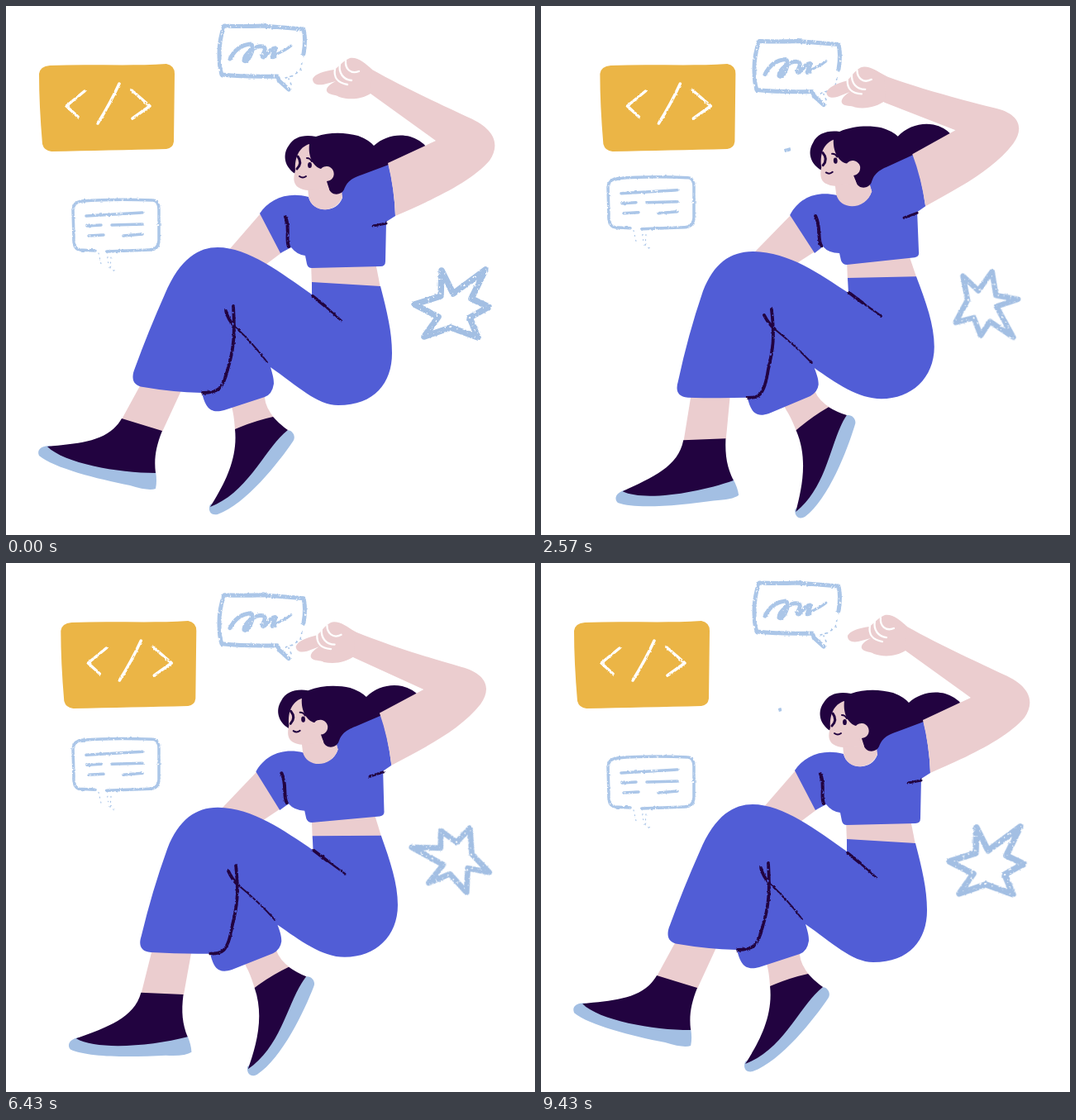
An HTML page for the animation above (9.5 s loop, 640 by 640 pixels).

```html
<!DOCTYPE html>
<html lang="en">
<head>
<meta charset="utf-8">
<title>Creative coding</title>
<style>
  html, body { margin: 0; width: 100%; height: 100%; overflow: hidden; background: #fff; }
  svg { display: block; width: 100vw; height: 100vh; }
  .blue { fill: #515dd6; }
  .skin { fill: #ebcdcf; }
  .dark { fill: #220340; }
  .sole { fill: #a3bfe3; }
  .line { fill: none; stroke-linecap: round; stroke-linejoin: round; filter: url(#chalk); }
  .pen { fill: none; stroke-linecap: round; }
  .ink { stroke: #220340; }
  .sky { stroke: #abc6e8; }
  .white { stroke: #fff; }
</style>
</head>
<body>
<svg viewBox="0 0 640 640">
  <defs>
    <filter id="chalk" x="-15%" y="-15%" width="130%" height="130%" color-interpolation-filters="sRGB">
      <feTurbulence type="fractalNoise" baseFrequency=".3" numOctaves="2" seed="4" result="noise"/>
      <feDisplacementMap in="SourceGraphic" in2="noise" scale="2.5" xChannelSelector="R" yChannelSelector="G" result="rough"/>
      <feColorMatrix in="noise" values="0 0 0 0 0  0 0 0 0 0  0 0 0 0 0  0 0 0 -9 7" result="grain"/>
      <feComposite in="rough" in2="grain" operator="in"/>
    </filter>
  </defs>

  <g id="card">
    <path fill="#ebb546" d="M40 82Q41 73 53 72C100 70 150 73 194 70Q204 72 204 82L203 164Q202 172 194 173C150 174 100 175 55 176Q46 175 44 167Q40 120 40 82Z"/>
    <g class="line white" stroke-width="3.5">
      <path d="M95 103L73 121L87 134"/>
      <path d="M137 94Q126 118 111 142"/>
      <path d="M152 102L174 121L153 136"/>
    </g>
  </g>

  <g id="sketch">
    <g class="line sky">
      <path stroke-width="5" d="M360 58Q363 40 360 28Q335 26 310 24Q285 25 264 24Q258 40 258 58Q258 75 261 83Q290 86 328 85L331 91L342 101"/>
      <path stroke-width="1.6" stroke-dasharray="2 5" d="M338 87L346 85L356 78L359 64M345 95L342 88"/>
      <path stroke-width="5" d="M271 64C276 54 284 47 296 46C303 50 292 70 288 66C288 58 302 47 311 49C318 52 306 62 312 62C316 58 322 50 326 51C326 56 318 64 325 61"/>
      <path stroke-width="3" d="M325 59C333 56 338 54 345 48"/>
      <path stroke-width="8" d="M291 62L290 65"/>
    </g>
  </g>

  <g id="note">
    <g class="line sky" stroke-width="3.5">
      <path d="M108 296L88 295Q81 292 82 280L81 246Q82 237 92 236Q130 233 178 235Q185 236 185 246L185 284Q184 295 174 295L122 297"/>
      <path d="M97 254Q130 252 165 250M98 266L115 265M128 265L165 264M100 278L118 277M142 278L165 276"/>
      <path stroke-width="1.2" stroke-dasharray="1 5" d="M112 299L115 312M122 298L124 313L132 322M127 304L126 317"/>
    </g>
  </g>

  <g id="star">
    <path class="line" stroke="#a3bfe3" stroke-width="7.5" d="M527 320L541 348L580 319L563 354L584 364L561 377L571 401L538 389L506 400L523 376L494 361L526 351Z"/>
  </g>

  <g id="curl">
    <g class="line sky" stroke-width="4" style="stroke-linecap:butt">
      <path pathLength="1" d="M254 194C266 190 278 176 281 162C282 148 268 147 265 160C264 172 274 182 302 173"/>
    </g>
  </g>

  <g id="rightFoot">
    <path class="skin" d="M268 455L312 450L313 474Q314 486 325 499L277 513Q276 495 273 485Z"/>
    <path class="sole" d="M341 513C348 514 351 522 347 527C330 552 290 603 256 615C247 617 244 610 247 603C285 590 310 535 341 513Z"/>
    <path class="dark" d="M277 512Q300 502 323 497Q332 507 341 513C313 535 294 588 247 606C262 582 281 550 277 512Z"/>
  </g>
  <g id="leftFoot">
    <path class="skin" d="M170 445L220 448L189 515L140 500Z"/>
    <path class="sole" d="M53 532C42 532 37 537 40 544C58 559 110 572 150 580Q172 587 181 584Q183 575 181 563C130 565 85 553 53 532Z"/>
    <path class="dark" d="M140 499L189 514C181 534 179 548 181 565C135 565 70 553 50 533C90 529 124 527 140 499Z"/>
  </g>

  <path class="skin" d="M308 251L262 304L310 316L334 298Z" data-to="M302 253L252 304L305 314L333 296Z"/>
  <path class="skin" d="M369 310L446 305L453 341L370 338Z" data-to="M370 306L444 298L455 330L371 333Z"/>

  <path class="blue"
    d="M370 334L453 339C461 370 467 394 467 420C467 456 446 483 402 483C376 483 352 459 320 437C323 447 324 451 324 457Q322 470 313 473L264 489C246 494 241 484 237 468Q200 467 166 461C153 459 151 450 156 438Q172 394 192 349C211 304 234 292 256 292C293 292 333 323 370 349Z"
    data-to="M371 329L454 327C466 358 476 386 476 412C476 450 448 475 412 475C384 475 357 456 331 438C335 448 336 453 336 458Q335 467 326 472L276 493C258 499 254 489 250 474Q213 475 178 474C165 473 163 465 166 455Q178 398 196 345C209 311 229 297 257 297C301 298 337 324 372 347Z"/>
  <g class="line ink" stroke-width="3.8">
    <path d="M371 351L386 363" data-to="M373 347L389 359"/>
    <path stroke-width="2.4" d="M386 363L406 381" data-to="M389 359L412 375"/>
    <path d="M275 363C277 395 276 415 268 440C262 466 255 467 238 468" data-to="M279 367C283 400 281 415 275 440C270 474 262 474 250 474"/>
    <path d="M266 369Q269 380 276 387" data-to="M270 374Q275 384 283 391"/>
    <path stroke-width="2" d="M276 387Q298 407 316 431" data-to="M283 391Q308 411 328 432"/>
  </g>

  <path class="blue"
    d="M366 231C340 224 318 234 307 251L332 299L345 292Q352 301 362 302L364 312Q365 317 370 317L453 315Q459 315 459 309L460 261L471 254Q470 222 462 188L425 198L402 213L407 232C400 252 370 250 366 231Z"
    data-to="M358 229C333 223 312 232 301 253L331 299L341 291Q348 299 361 299L363 308Q365 313 370 313L452 304Q458 303 457 297L455 249L465 242Q460 205 449 176L425 190L393 203L400 224C393 246 363 246 358 229Z"/>
  <g class="line ink" stroke-width="4">
    <path d="M338 255C344 268 338 282 342 291" data-to="M332 254C339 268 334 282 339 290"/>
    <path stroke-width="3" d="M444 266L460 263" data-to="M439 256L455 250"/>
  </g>
  <path class="skin" d="M364 208L366 230C370 252 400 251 407 231L404 205Z" data-to="M354 204L357 228C362 248 393 247 400 224L393 200Z"/>

  <g id="head">
    <path class="dark" d="M349 202C336 194 333 179 341 168C347 157 360 154 374 157C391 151 410 152 425 156Q438 161 444 168C456 157 473 153 488 157Q501 161 508 170L462 191L430 203C414 208 411 214 408 221C404 229 391 229 389 218L380 200Z"/>
    <path class="skin" d="M366 166C353 170 348 183 349 198C346 208 347 214 352 218Q358 222 365 222L390 221L387 211A9 9 0 1 0 380 196C372 194 364 183 366 166Z"/>
    <path class="pen ink" stroke-width="3" d="M352 181Q358 189 351 196"/>
    <ellipse class="dark" cx="366.5" cy="191.5" rx="2.4" ry="3.6"/>
    <path class="pen ink" stroke-width="2" d="M363 183Q367 183 369 187M354 205Q358 208 362 205"/>
  </g>

  <path class="skin"
    d="M471 254Q470 222 462 190L520 163L441 106L425 100L430 69L443 77C480 98 530 121 560 135C592 149 598 168 585 187C562 214 510 237 471 254Z"
    data-to="M465 242Q460 208 449 179L501 150L415 117L398 105L402 77L419 86C455 99 510 114 548 123C580 130 584 148 571 166C545 200 500 222 465 242Z"/>
  <g id="hand">
    <path class="skin" d="M443 77C436 70 425 61 416 63C406 67 403 74 397 77C384 79 374 82 371 88C371 95 377 96 384 95L399 91C391 95 387 99 388 103C390 108 399 107 403 110C415 114 430 113 441 106Z"/>
    <path class="pen white" stroke-width="2.3" d="M398 76C396 88 402 93 413 95M404 70C402 81 408 89 418 90M411 66C410 76 417 83 427 79"/>
  </g>
</svg>

<script>
const LOOP = 9500, FPS = 14, SPIN = 9430;
const $ = id => document.getElementById(id);
const clamp = v => Math.min(1, Math.max(0, v));
const set = (id, value) => $(id).setAttribute('transform', value);
const numbers = d => d.match(/-?[\d.]+/g).map(Number);

const morphs = [...document.querySelectorAll('[data-to]')].map(el => {
  const shape = el.getAttribute('d');
  return { el, shape, from: numbers(shape), to: numbers(el.dataset.to) };
});

// One smooth sway there and back, played twice per loop.
function sway(t, period, second) {
  const k = clamp((t >= second ? t - second : t) / period);
  return (1 - Math.cos(2 * Math.PI * k)) / 2;
}

const curls = [
  { start: 0, end: 2640, x: 0, y: 0 },
  { start: 3470, end: 5800, x: 0, y: 17 },
  { start: 6530, end: 9460, x: -11, y: 4 }
];
const curlPath = $('curl').querySelector('path');

function drawCurl(t) {
  const c = curls.find(c => t > c.start && t < c.end);
  $('curl').style.display = c ? '' : 'none';
  if (!c) return;
  const head = clamp((t - c.start) / 1170);
  const tail = clamp(1 - (c.end - t) / 1070);
  set('curl', `translate(${c.x} ${c.y})`);
  curlPath.setAttribute('stroke-dasharray', `${Math.max(0, head - tail)} 2`);
  curlPath.setAttribute('stroke-dashoffset', -tail);
}

function draw(t) {
  const p = sway(t, 4690, 4825);
  const late = p * p;
  const feet = .75 * p + .25 * late;
  for (const m of morphs) {
    let i = 0;
    m.el.setAttribute('d', m.shape.replace(/-?[\d.]+/g, () => {
      const v = m.from[i] + (m.to[i] - m.from[i]) * p;
      i++;
      return v.toFixed(2);
    }));
  }
  set('leftFoot', `rotate(${-20 * feet} 233 418)`);
  set('rightFoot', `rotate(${-18 * feet} 297 410)`);
  set('head', `translate(${-5.5 * (p + late) + 1} ${1 - 6 * late}) rotate(${-4.5 * late} 370 200)`);
  set('hand', `translate(${-27 * p} ${11 * p}) rotate(${-7 * p} 419 85)`);
  set('card', `translate(${32.5 * sway(t, 4600, 4790)} 0)`);
  set('sketch', `translate(0 ${19 * p})`);
  set('note', `translate(0 ${-28 * p})`);
  set('star', `translate(540 361) rotate(${360 * t / SPIN}) scale(${1 - .13 * p}) translate(-540 -361)`);
  drawCurl(t);
}

let last = -1;
function tick() {
  const step = Math.floor((performance.now() % LOOP) * FPS / 1000 + .05);
  if (step !== last) draw(Math.min(step * 1000 / FPS, SPIN));
  last = step;
  requestAnimationFrame(tick);
}
tick();
</script>
</body>
</html>
```
